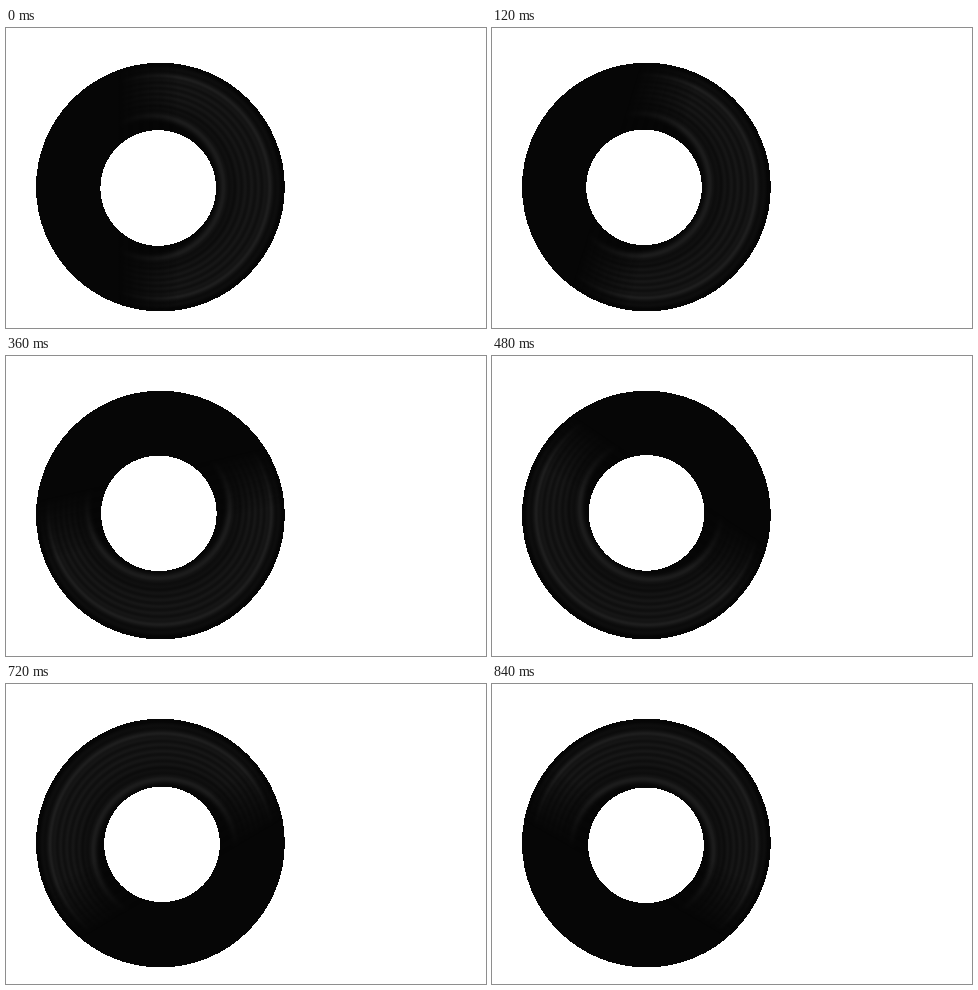
An HTML page for the animation above (0.96 s loop, 480 px wide and 300 px high).

```html
<!DOCTYPE html>
<html lang="en">
<head>
<meta charset="utf-8">
<title>Spinning disc</title>
<style>
  html, body { margin: 0; width: 100%; height: 100%; overflow: hidden; background: #fff; }
  svg { display: block; width: 100%; height: 100%; }
</style>
</head>
<body>
<svg viewBox="0 0 480 300">
  <defs>
    <!-- The focal point crowds the grooves together on the lit side -->
    <radialGradient id="grooves" gradientUnits="userSpaceOnUse" cx="0" cy="0" r="124" fx="-20" fy="0"></radialGradient>
    <linearGradient id="fade" gradientUnits="userSpaceOnUse" x1="-42" x2="18" y1="0" y2="0">
      <stop offset="0" stop-color="#000"/>
      <stop offset="1" stop-color="#fff"/>
    </linearGradient>
    <mask id="lit" maskUnits="userSpaceOnUse" x="-125" y="-125" width="250" height="250">
      <rect x="-125" y="-125" width="250" height="250" fill="url(#fade)"/>
    </mask>
  </defs>
  <rect width="480" height="300" fill="#fff"/>
  <g transform="translate(154.4 159.1)">
    <circle r="124.4" fill="#060606" shape-rendering="crispEdges"/>
    <g id="gloss"><circle r="123" fill="url(#grooves)" mask="url(#lit)"/></g>
    <circle id="hole" r="57.8" fill="#fff" shape-rendering="crispEdges"/>
  </g>
</svg>
<script>
  const STEP = 120, STEPS = 8, RIM = 124, FOCUS = 20, BASE = 6;
  const $ = id => document.getElementById(id);
  const peak = (r, at, width) => Math.exp(-(((r - at) / width) ** 2));

  // Grey level at distance r from the centre, along the light
  function shade(r) {
    const body = Math.sin(Math.PI * Math.min(1, Math.max(0, (r - 66) / 55))) ** 0.5;
    const ripple = 4 * Math.cos(2 * Math.PI * (r - 78) / 6.7);
    return BASE + body * (13 + ripple) + 16 * peak(r, 109, 2) + 22 * peak(r, 63, 4);
  }

  let stops = '';
  for (let r = 54; r <= RIM; r++) {
    const v = Math.round(shade(r));
    stops += `<stop offset="${(r + FOCUS) / (RIM + FOCUS)}" stop-color="rgb(${v},${v},${v})"/>`;
  }
  $('grooves').innerHTML = stops;

  // The turn starts slowly and catches up towards the end of the loop
  function turnAt(u) {
    return 360 * u - 56 * Math.sin(Math.PI * u) - 9 * Math.sin(2 * Math.PI * u);
  }

  function draw(ms) {
    const turn = turnAt(Math.floor(ms / STEP) % STEPS / STEPS);
    const a = (turn + 155) * Math.PI / 180;
    $('gloss').setAttribute('transform', `rotate(${turn})`);
    $('hole').setAttribute('cx', 2.2 * Math.cos(a) - 0.2);
    $('hole').setAttribute('cy', 2.2 * Math.sin(a));
  }

  const start = performance.now();
  function tick() {
    draw(performance.now() - start);
    requestAnimationFrame(tick);
  }
  tick();
</script>
</body>
</html>
```
